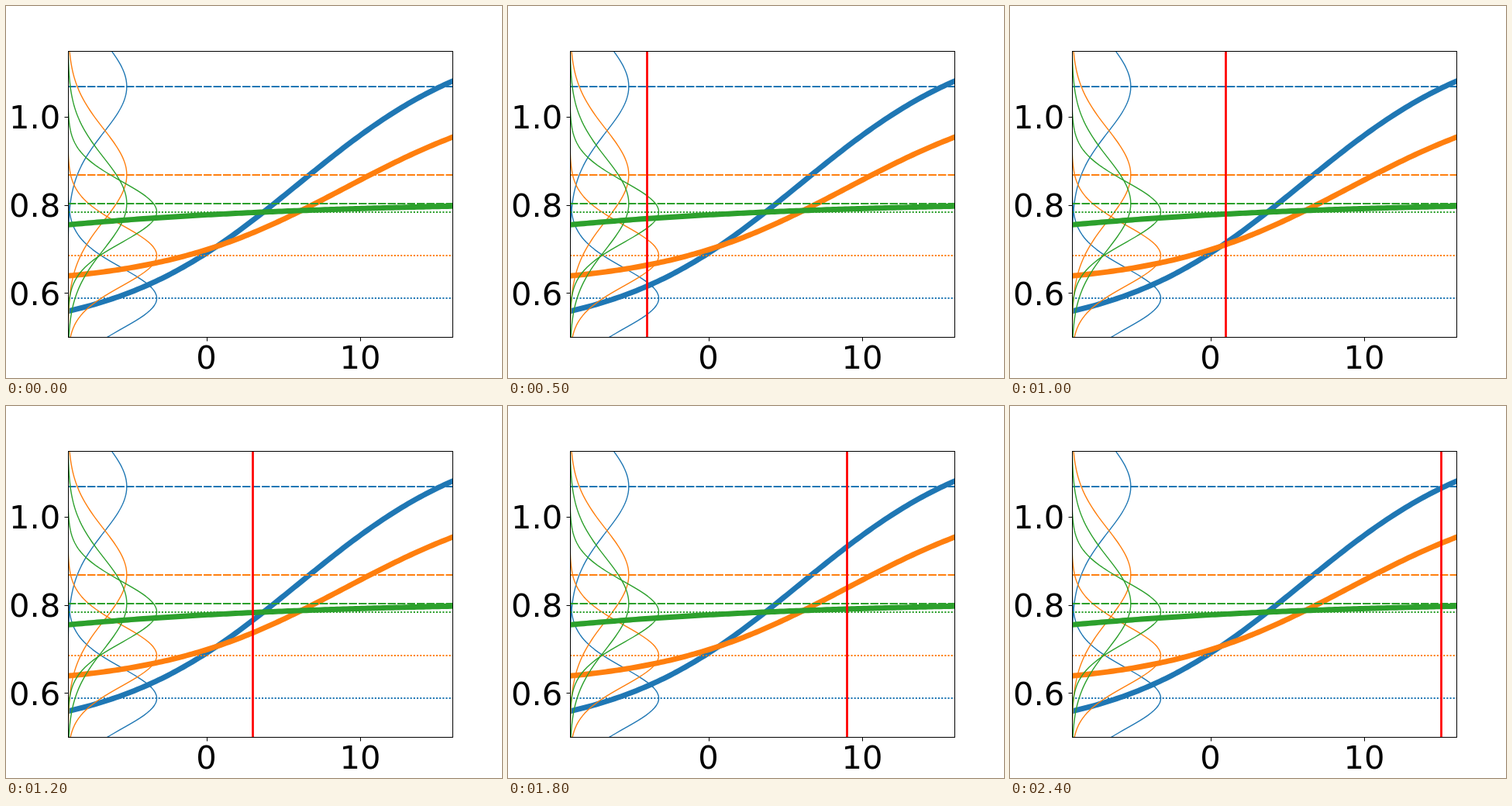
An HTML page with a canvas that plays this animation: 640 px wide and 480 px high, repeating every 2.5 s.

```html
<!DOCTYPE html>
<html lang="en">
<head>
<meta charset="utf-8">
<title>Curves with sweeping marker</title>
<style>
  html, body { margin: 0; width: 100%; height: 100%; overflow: hidden; background: #fff; }
  canvas { display: block; width: 640px; height: 480px; }
</style>
</head>
<body>
<canvas id="plot" width="640" height="480"></canvas>
<script>
const ctx = document.getElementById('plot').getContext('2d');
const LEFT = 80, RIGHT = 576, TOP = 57.6, BOTTOM = 427.2;
const X0 = -9, X1 = 16, Y0 = 0.5, Y1 = 1.15;
const STEP = 100, STEPS = 25;
const PT = 100 / 72;

const px = x => LEFT + (x - X0) / (X1 - X0) * (RIGHT - LEFT);
const py = y => BOTTOM - (y - Y0) / (Y1 - Y0) * (BOTTOM - TOP);
const bell = (y, mean, sd) =>
  Math.exp(-(((y - mean) / sd) ** 2) / 2) / (sd * Math.sqrt(2 * Math.PI));

const series = [
  { color: '#1f77b4', low: 0.588, high: 1.0685,
    value: x => 0.848 + 0.341 * Math.tanh((x - 6) / 12) },
  { color: '#ff7f0e', low: 0.685, high: 0.868,
    value: x => 0.838 + 0.22 * Math.tanh((x - 9) / 12) },
  { color: '#2ca02c', low: 0.784, high: 0.803,
    value: x => 0.7548 + 0.0548 * (1 - Math.exp(-(x + 9) / 17)) }
];

function stroke(color, width, points, dash = []) {
  ctx.strokeStyle = color;
  ctx.lineWidth = width;
  ctx.lineJoin = 'round';
  ctx.setLineDash(dash);
  ctx.beginPath();
  for (const [x, y] of points) ctx.lineTo(x, y);
  ctx.stroke();
}

function sample(from, to, count, fn) {
  return Array.from({ length: count + 1 }, (_, i) => fn(from + (to - from) * i / count));
}

function level(color, y, dash) {
  const row = Math.round(py(y));
  stroke(color, 2, [[LEFT, row], [RIGHT, row]], dash);
}

function drawSeries({ color, low, high, value }) {
  stroke(color, 5 * PT, sample(X0 - 0.5, X1 + 0.5, 130, x => [px(x), py(value(x))]));
  for (const [mean, sd] of [[low, 0.0691], [high, 0.1044]]) {
    stroke(color, PT, sample(Y0 - 0.02, Y1 + 0.02, 120, y => [px(X0 + bell(y, mean, sd)), py(y)]));
  }
  level(color, low, [1.5 * PT, 1.5 * PT]);
  level(color, high, [7.5 * PT, 1.5 * PT]);
}

function drawAxes() {
  ctx.fillStyle = '#000';
  ctx.fillRect(80, 58, 497, 1);
  ctx.fillRect(80, 427, 497, 1);
  ctx.fillRect(80, 58, 1, 370);
  ctx.fillRect(576, 58, 1, 370);

  ctx.font = 30 * PT + 'px "DejaVu Sans", sans-serif';
  ctx.textBaseline = 'alphabetic';
  ctx.textAlign = 'center';
  for (const x of [0, 10]) {
    ctx.fillRect(Math.round(px(x)), 428, 1, 4.5);
    ctx.fillText(String(x), px(x), 467.5);
  }
  ctx.textAlign = 'right';
  for (const y of [0.6, 0.8, 1]) {
    ctx.fillRect(75.5, Math.round(py(y)), 4.5, 1);
    ctx.fillText(y.toFixed(1), 70.3, py(y) + 15.4);
  }
}

function draw(time) {
  const step = Math.floor(time / STEP) % STEPS;
  ctx.fillStyle = '#fff';
  ctx.fillRect(0, 0, 640, 480);
  ctx.save();
  ctx.beginPath();
  ctx.rect(LEFT, 58, RIGHT - LEFT, 369);
  ctx.clip();
  series.forEach(drawSeries);
  if (step > 0) {
    const x = Math.round(px(X0 + step)) + 0.5;
    stroke('#f00', 2 * PT, [[x, TOP], [x, BOTTOM]]);
  }
  ctx.restore();
  drawAxes();
}

const start = performance.now();
function tick() {
  draw(performance.now() - start);
  requestAnimationFrame(tick);
}
tick();
</script>
</body>
</html>
```
